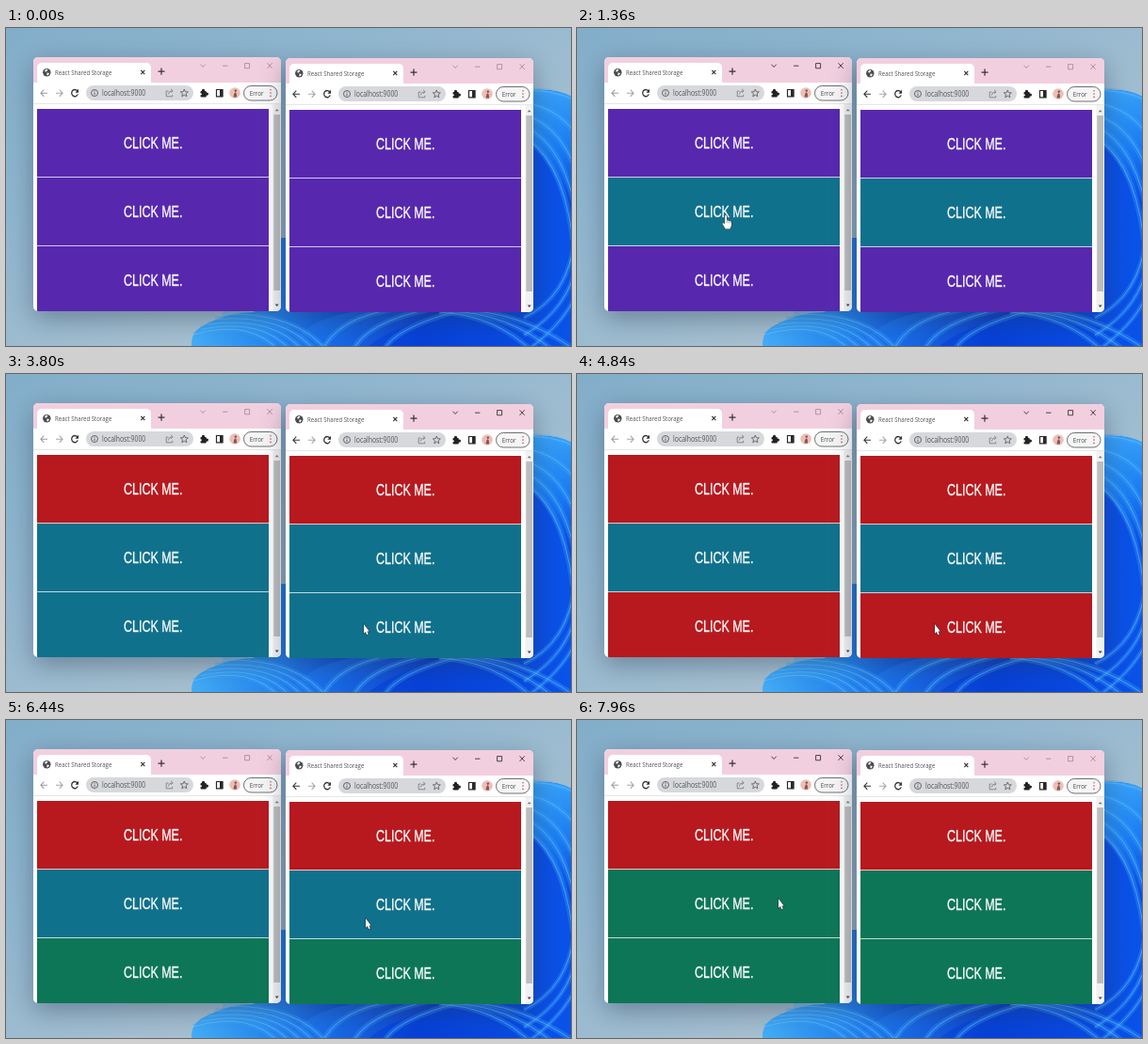
Animation, 600 px wide and 338 px high, one loop 8 s. Source, as an HTML page with a canvas:

```html
<!DOCTYPE html>
<html lang="en">
<head>
<meta charset="utf-8">
<title>Shared storage demo</title>
<style>
  html, body { margin: 0; width: 100%; height: 100%; overflow: hidden; }
  canvas { display: block; width: 600px; height: 338px; }
</style>
</head>
<body>
<canvas id="stage"></canvas>
<script>
const W = 600, H = 338, LOOP = 8000;
const SQUEEZE = 0.78;
const PURPLE = '#5728ae', TEAL = '#10718c', RED = '#b7191e', GREEN = '#0d7656';

// Each row: [time, colour] steps shared by both windows.
const ROWS = [
  [[0, PURPLE], [2320, TEAL], [2840, RED]],
  [[0, PURPLE], [1200, TEAL], [6680, RED], [7640, GREEN]],
  [[0, PURPLE], [3560, TEAL], [4400, RED], [5360, GREEN]]
];
const FOCUS = [[0, -1], [1160, 0], [2320, 1], [7600, 0]];
const POINTER = [
  [400, 100, 345], [1000, 158, 199], [1720, 158, 199], [2240, 373, 133.5],
  [2960, 373, 133.5], [3400, 380, 266], [5720, 380, 266], [6200, 382, 211],
  [6880, 382, 211], [7480, 214, 190], [8000, 214, 190]
];

const canvas = document.getElementById('stage');
const ratio = window.devicePixelRatio || 1;
canvas.width = W * ratio;
canvas.height = H * ratio;
const ctx = canvas.getContext('2d');
ctx.scale(ratio, ratio);

const stepAt = (steps, t) => steps.filter(s => s[0] <= t).pop()[1];

function box(x, y, w, h, fill, radius = 0) {
  ctx.fillStyle = fill;
  ctx.beginPath();
  ctx.roundRect(x, y, w, h, radius);
  ctx.fill();
}

function stroke(path, color, width = 1) {
  ctx.strokeStyle = color;
  ctx.lineWidth = width;
  ctx.stroke(new Path2D(path));
}

function shape(path, color) {
  ctx.fillStyle = color;
  ctx.fill(new Path2D(path));
}

function disc(x, y, r, fill) {
  ctx.fillStyle = fill;
  ctx.beginPath();
  ctx.arc(x, y, r, 0, 7);
  ctx.fill();
}

function ring(x, y, r, color, width = 1) {
  ctx.strokeStyle = color;
  ctx.lineWidth = width;
  ctx.beginPath();
  ctx.arc(x, y, r, 0, 7);
  ctx.stroke();
}

function label(text, x, y, font, color, weight = 0) {
  ctx.save();
  ctx.translate(x, y);
  ctx.scale(SQUEEZE, 1);
  ctx.font = font;
  ctx.fillStyle = ctx.strokeStyle = color;
  ctx.fillText(text, 0, 0);
  if (weight) {
    ctx.lineWidth = weight;
    ctx.strokeText(text, 0, 0);
  }
  ctx.restore();
}

function blend(x0, y0, x1, y1, colors) {
  const gradient = ctx.createLinearGradient(x0, y0, x1, y1);
  colors.forEach((c, i) => gradient.addColorStop(i / (colors.length - 1), c));
  return gradient;
}

// Bands of light spread evenly between two quadratic curves.
function ribbons(from, to, count, width) {
  for (let i = 0; i < count; i++) {
    const k = i / (count - 1);
    const [x0, y0, cx, cy, x1, y1] = from.map((v, j) => v + (to[j] - v) * k);
    const curve = `M${x0} ${y0}Q${cx} ${cy} ${x1} ${y1}`;
    stroke(curve, 'rgba(58,165,255,0.3)', width);
    stroke(curve, 'rgba(110,200,255,0.65)', 0.9);
  }
}

function wallpaper() {
  box(0, 0, W, H, blend(0, 0, 180, H, ['#82adc9', '#90b6cf', '#a5bfd0']));
  shape('M197 338Q196 321 214 314Q238 302 262 302L291 290V223H550V67Q582 63 600 73V338z',
    blend(197, 0, 600, 0, ['#43adf8', '#2487ef', '#0b50dc', '#0540d8', '#0647e0', '#0a52e8']));
  shape('M545 67Q582 63 600 73V215Q588 140 545 112z',
    blend(560, 66, 580, 190, ['#37a2f8', '#1b7df2', '#0648e0']));
  ribbons([540, 68, 580, 62, 610, 80], [540, 112, 590, 130, 602, 225], 5, 6);
  ribbons([604, 222, 598, 285, 550, 308], [610, 270, 600, 310, 550, 345], 3, 5);
  shape('M300 338Q325 304 385 300H500Q420 310 385 338z',
    blend(310, 0, 470, 0, ['#1c78ee', '#0837c8']));
  ribbons([230, 304, 310, 302, 342, 345], [199, 326, 260, 308, 292, 345], 5, 6);
  ribbons([335, 345, 350, 308, 415, 298], [400, 345, 410, 318, 490, 298], 3, 6);
  ribbons([480, 300, 545, 300, 604, 342], [460, 302, 520, 305, 560, 345], 3, 6);
}

function titleBar(focused) {
  const ink = focused ? '#3b3036' : '#a58e99';
  box(29, 31, 263, 40, '#f2cfdf', [5, 5, 0, 0]);
  box(33, 37, 121, 24, '#fff', [5, 5, 0, 0]);
  box(29, 58, 263, 23, '#fff');
  disc(43.3, 47.2, 4.2, '#4a4d50');
  shape('M41 45.5l2-2 1.4 1-1 1.3-1.2 1zM43.5 47.5l2.5.5-1.6 2.6-1-.5z', '#fff');
  label('React Shared Storage', 52, 49.6, '7.8px "Open Sans", sans-serif', '#505358');
  stroke('M143.3 44.8l4 4.4m0-4.4l-4 4.4', '#333', 1.2);
  stroke('M161.5 46.2h7m-3.5-3.6v7.2', '#3b3036', 1.2);
  stroke('M206.5 38.7l2.6 2.8 2.6-2.8M230 40.2h5.4M253.6 37.6h5v5.2h-5zM277.5 37.3l5.2 5.6m0-5.6l-5.2 5.6', ink, 0.9);
}

function toolbar(hasHistory) {
  stroke('M44 69.2h-7m3.3-3.6l-3.4 3.6 3.4 3.6', hasHistory ? '#34373a' : '#999da1', 1.1);
  stroke('M53 69.2h7m-3.3-3.6l3.4 3.6-3.4 3.6', '#a4a7aa', 1.1);
  stroke('M76 67.2a3.4 3.6 0 1 0 .3 3.2', '#34373a', 1.3);
  shape('M77 64.8v3.9h-3.6z', '#34373a');

  box(85, 61, 114, 16, '#d7d8dc', 8);
  ring(94, 69, 3.5, '#55585c', 0.9);
  stroke('M94 68.6v2.5M94 66.7v1', '#55585c', 0.9);
  label('localhost:9000', 102, 72.4, '8.8px "Open Sans", sans-serif', '#505357');
  stroke('M172.5 67h-2.3v5.8h6.5v-2M172.3 70.6q.3-3.8 4.4-3.8m-1.7-2l2.2 2-2.2 2', '#74777b', 0.8);
  stroke('M189.3 65l1.1 2.7 2.9.2-2.2 1.9.7 3-2.5-1.6-2.5 1.6.7-3-2.2-1.9 2.9-.2z', '#5f6266', 0.9);

  box(206.5, 67, 6.3, 6.5, '#222', 1);
  disc(209.5, 66.4, 1.6, '#222');
  disc(213.4, 70.1, 1.6, '#222');
  disc(206.8, 70.3, 1.1, '#fff');
  stroke('M223.5 65.5h6.5v7.4h-6.5z', '#292929', 1.2);
  box(227, 65.3, 3.2, 7.8, '#292929');

  disc(243, 69, 5.8, '#f0bdb5');
  disc(243.8, 66.6, 1.2, '#6b4f50');
  shape('M241.6 73.4q.4-5 2-5.2 1.5.2 1.4 5.2z', '#7a5a5a');

  box(252.5, 61.5, 35.5, 15.5, '#f5f5f5', 7.7);
  ctx.strokeStyle = '#5d6064';
  ctx.lineWidth = 0.9;
  ctx.stroke();
  label('Error', 258.8, 71.9, '8px "Open Sans", sans-serif', '#45484c');
  [65.8, 69.1, 72.4].forEach(y => disc(281, y, 0.8, '#c9545a'));
}

function browser(index, t) {
  ctx.save();
  ctx.translate(index * 268, index);
  ctx.save();
  ctx.shadowColor = 'rgba(35,50,75,0.42)';
  ctx.shadowBlur = 28 * ratio;
  ctx.shadowOffsetY = 8 * ratio;
  box(29, 31, 263, 270, '#fff', 5);
  ctx.restore();

  ctx.beginPath();
  ctx.roundRect(29, 31, 263, 270, 5);
  ctx.clip();
  titleBar(stepAt(FOCUS, t) === index);
  toolbar(index === 1);
  box(29, 80.3, 263, 0.7, '#dedee0');

  ROWS.forEach((steps, i) => {
    const y = 86 + i * 73;
    box(33, y, 246, 72.2, stepAt(steps, t));
    label('CLICK ME.', 125, y + 42, '16px "Liberation Sans", Arial, sans-serif', '#fff', 0.35);
  });

  box(283.5, 81, 8.5, 220, '#f1f1f1');
  box(284.3, 92, 6.7, 187, '#bdbdbd');
  shape('M285.7 88.3l2-2.4 2 2.4z', '#777');
  shape('M285.7 293.5l2 2.4 2-2.4z', '#444');
  ctx.restore();
}

function pointer(t) {
  const next = POINTER.findIndex(p => p[0] > t);
  if (next < 1) return;
  const [t0, x0, y0] = POINTER[next - 1], [t1, x1, y1] = POINTER[next];
  const k = (t - t0) / (t1 - t0), ease = k * k * (3 - 2 * k);
  const overLeftRows = t > 640 && t < 1960;
  const path = overLeftRows
    ? 'M-1.2 .8Q0-.6 1.2.8V6l1.2-.3 1 .7 1.3-.1.8.8 1 .4V12L5 15.7H-.5L-4 9.8Q-3.6 8-1.2 10z'
    : 'M0 0V10.6L2.1 8.6 3.6 12.2 5.2 11.5 3.7 8.1H6.2z';
  ctx.save();
  ctx.translate(x0 + (x1 - x0) * ease, y0 + (y1 - y0) * ease);
  ctx.scale(0.92, 0.92);
  stroke(path, '#26303a', 1.1);
  shape(path, '#fff');
  if (overLeftRows) stroke('M1.2 6v3M3.4 6.4v2.8M5.3 7.1v2', '#59636b', 0.6);
  ctx.restore();
}

function draw() {
  const t = performance.now() % LOOP;
  wallpaper();
  browser(0, t);
  browser(1, t);
  pointer(t);
  requestAnimationFrame(draw);
}
draw();
</script>
</body>
</html>
```
